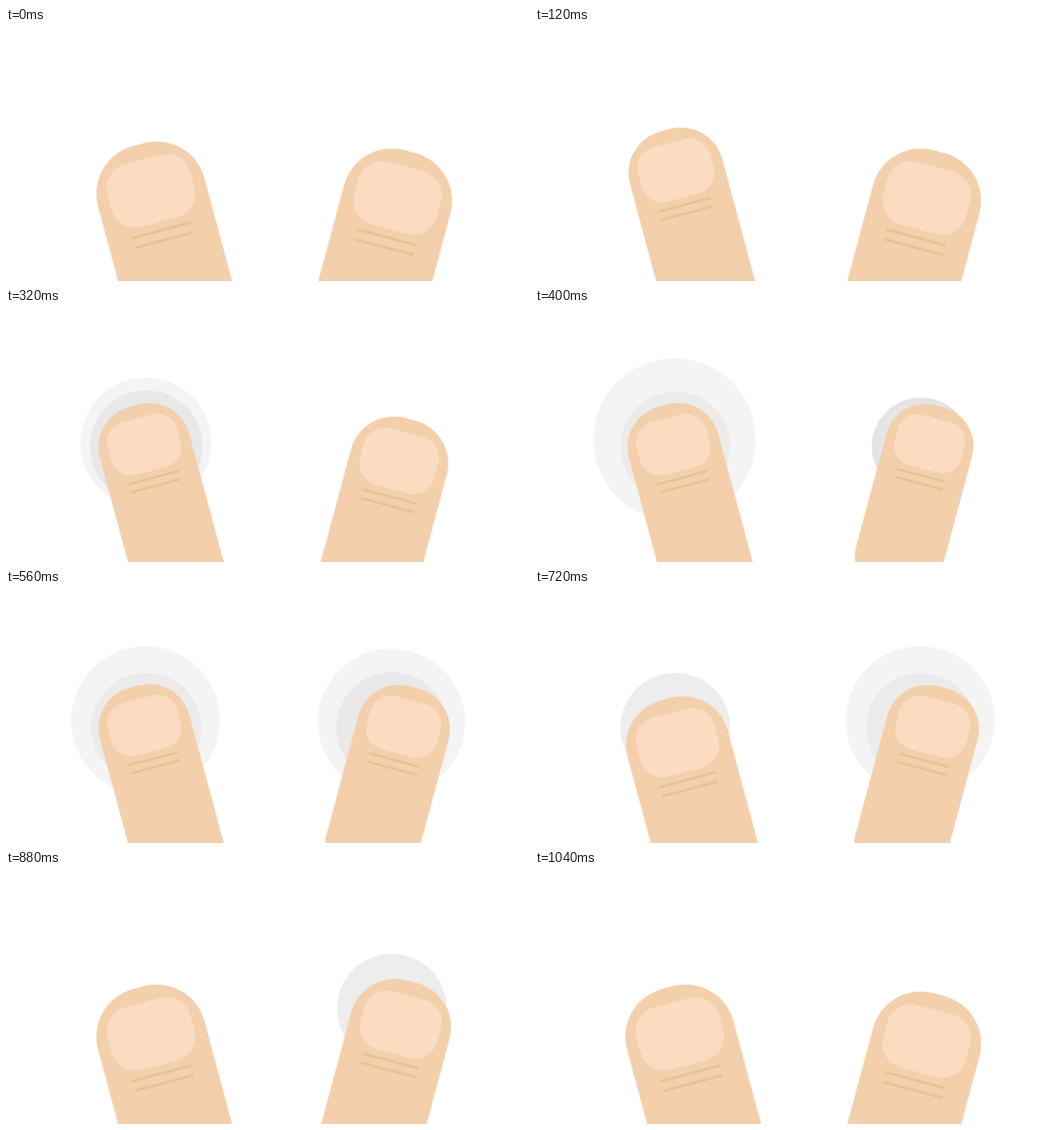
An HTML page that plays this animation: 660x320 px, repeating every 1080 ms.

```html
<!DOCTYPE html>
<html lang="en">
<head>
<meta charset="utf-8">
<title>Tapping thumbs</title>
<style>
  html, body { margin: 0; width: 100%; height: 100%; overflow: hidden; background: #fff; }
  svg { display: block; width: 660px; height: 320px; }

  .disc, .ring, .thumb { animation: 1080ms linear infinite both; }
  .disc { fill: #e4e4e4; animation-name: disc; }
  .ring { fill: #e9e9e9; animation-name: ring; }
  .late .disc, .late .ring { animation-delay: -880ms; }
  .left { animation-name: press-left; }
  .right { animation-name: press-right; }

  .skin { fill: #f3cfab; }
  .nail { fill: #fbdcc1; }
  .crease { stroke: #e5bf96; stroke-width: 3; }

  /* Circles have radius 100, so the scale is the radius in percent. */
  @keyframes disc {
    0%, 7.41% { transform: translate(177px, 174px) scale(0); opacity: 1; }
    18.52% { transform: translate(177px, 174px) scale(.62); }
    25.93% { transform: translate(177px, 174px) scale(.72); opacity: 1; }
    37.04%, 74.07% { transform: translate(177px, 174px) scale(.693); opacity: .67; }
    74.08%, 100% { transform: translate(177px, 174px) scale(0); opacity: 0; }
  }
  @keyframes ring {
    0%, 11.11% { transform: translate(177px, 174px) scale(0); opacity: .5; }
    18.52% { transform: translate(177px, 174px) scale(.55); }
    22.22% { transform: translate(177px, 174px) scale(.62); }
    33.33% { transform: translate(176.4px, 167px) scale(.925); }
    37.04% { transform: translate(176px, 165px) scale(1.027); }
    46.3%, 51.85% { transform: translate(176px, 165px) scale(.94); opacity: .5; }
    62.96%, 100% { transform: translate(176px, 165px) scale(.94); opacity: 0; }
  }
  @keyframes press-left {
    0% { transform: rotate(-15deg) translate(123.3px, 185.7px) scale(1); animation-timing-function: ease-in-out; }
    18.52% { transform: rotate(-15deg) translate(126px, 158.6px) scale(.805); }
    25.93%, 51.85% { transform: rotate(-15deg) translate(124.2px, 159.9px) scale(.84); animation-timing-function: ease-in-out; }
    77.78%, 100% { transform: rotate(-15deg) translate(123.3px, 185.7px) scale(1); }
  }
  @keyframes press-right {
    0%, 22.22% { transform: rotate(15deg) translate(533px, 19.1px) scale(1); animation-timing-function: ease-in-out; }
    37.04% { transform: rotate(15deg) translate(525.1px, -13.1px) scale(.804); }
    44.44%, 66.67% { transform: rotate(15deg) translate(529.6px, -14.3px) scale(.848); animation-timing-function: ease-in-out; }
    96.3%, 100% { transform: rotate(15deg) translate(533px, 19.1px) scale(1); }
  }
</style>
</head>
<body>
<svg viewBox="0 0 660 320">
  <defs>
    <g id="tip">
      <rect class="nail" x="-54.2" y="19.8" width="108.4" height="81.6" rx="30.8"/>
      <path class="crease" d="M-38.8 112.3H38.8M-38.4 125H38.4"/>
    </g>
  </defs>

  <g>
    <circle class="disc" r="100"/>
    <circle class="ring" r="100"/>
  </g>
  <g class="late" transform="translate(310 0)">
    <circle class="disc" r="100"/>
    <circle class="ring" r="100"/>
  </g>

  <g class="thumb left">
    <rect class="skin" x="-69.5" width="139" height="420" rx="62.5"/>
    <use href="#tip"/>
  </g>
  <g class="thumb right">
    <rect class="skin" x="-69.5" width="139" height="308.5" rx="62.5"/>
    <use href="#tip"/>
  </g>
</svg>
</body>
</html>
```
